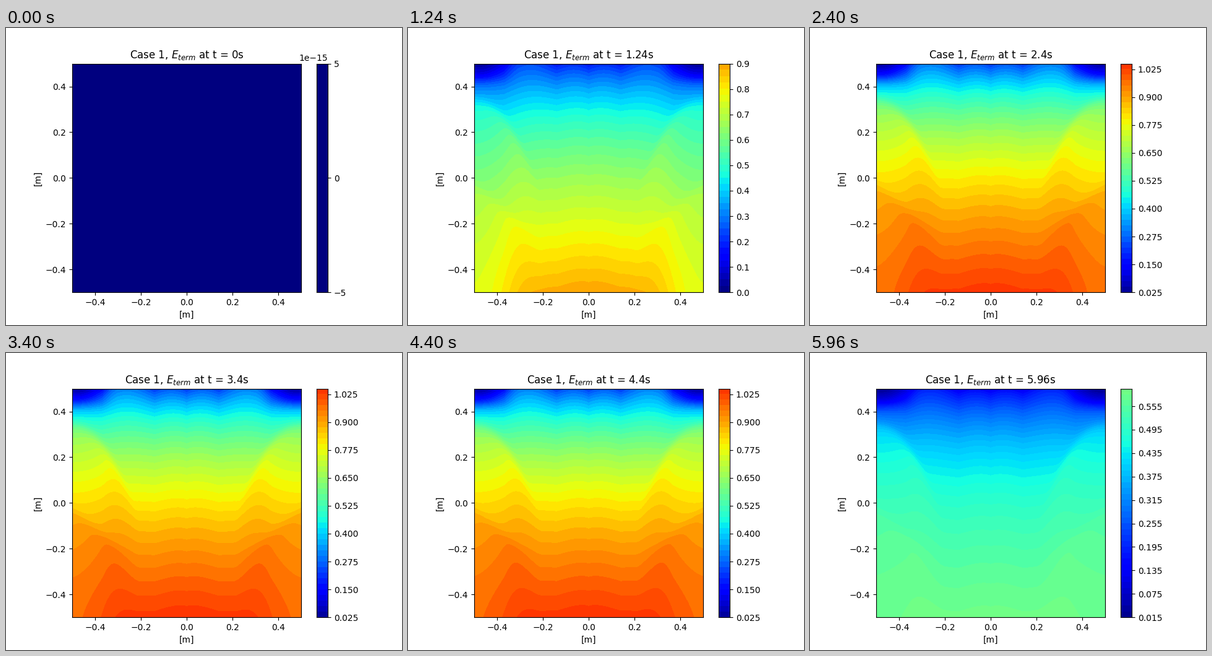
Animation of 640x480 px, one loop 6000 ms. Source, as a matplotlib script:

```python
import numpy as np
import matplotlib.pyplot as plt
from matplotlib.animation import FuncAnimation
from matplotlib.colorbar import make_axes
from matplotlib.ticker import FixedLocator, MaxNLocator

FRAMES, STEP = 150, 0.04
T_OFF = 4.5


def smooth(a, b, v):
    s = np.clip((v - a) / (b - a), 0, 1)
    return s * s * (3 - 2 * s)


def sigmoid(v):
    return 1 / (1 + np.exp(-v))


def front(depth, height, fade):
    """Sharp step at depth 0 that fades out further down."""
    return height * sigmoid(depth / .015) * np.exp(-np.maximum(depth, 0) / fade)


def steady_state(x, y):
    """Logarithmic fall towards the top, with ripples and side fronts."""
    d = .5 - y
    phase = np.minimum(np.pi * (x / .14) ** .713, 2 * np.pi)
    ripple = np.abs(np.sin(phase)) * (.01 + .12 * x * np.exp(-d / .12))
    depth = d * (1 - .15 * np.minimum(x, .22)) + ripple
    e = .21 + .4087 * np.log(1 + depth / .15)

    upper = .34 - 5 * (.5 - x) ** 2
    lower = -.03 - .85 * (.5 - x)
    e += smooth(.2, .36, x) * (front(upper - y, .11, .25) + front(lower - y, .05, .2))
    e -= .1837 * smooth(.3, .48, x) * sigmoid((y - .43) / .015)
    return e - .068 * smooth(.2, .5, x) * d ** 4


axis = np.linspace(-.5, .5, 370)
X, Y = np.meshgrid(np.abs(axis), axis)
steady = steady_state(X, Y)
side = smooth(.15, .5, X)

rise_rate = .68 + .052 * steady ** 8 - .07 * side
rest = .69 - .06 * side + .07 * np.sin(np.pi * steady)
fade_rate = .125 - .08 * side


def field(t):
    u = rise_rate * t
    e = steady * u / (1 + u ** 6) ** (1 / 6)
    d = t - T_OFF
    if d > 0:
        e = e * ((1 - rest) * np.exp(-d / .12) + rest * np.exp(-d * fade_rate))
    return e


def contour_levels(lo, hi):
    lev = MaxNLocator(41, min_n_ticks=1).tick_values(lo, hi)
    first = max(np.searchsorted(lev, lo) - 1, 0)
    return lev[first:np.searchsorted(lev, hi, side="right") + 1]


fig, ax = plt.subplots(figsize=(6.4, 4.8), dpi=100)
cax, _ = make_axes(ax)

style = dict(cmap="jet", vmin=0, vmax=1.22, origin="lower", interpolation="nearest")
image = ax.imshow(steady, extent=(-.5, .5, -.5, .5), **style)
ax.set(xlabel="[m]", ylabel="[m]")
for a in (ax.xaxis, ax.yaxis):
    a.set_major_locator(FixedLocator(np.arange(-2, 3) / 5))
title = ax.set_title("")

bar = cax.imshow([[0], [1]], extent=(0, 1, 0, 1), transform=cax.transAxes,
                 aspect="auto", **style)
cax.set_xticks([])
cax.yaxis.tick_right()
cax.yaxis.set_offset_position("right")


def update(i):
    t = i * STEP
    e = field(t)
    lev = contour_levels(e.min(), e.max())
    mid = (lev[:-1] + lev[1:]) / 2
    band = np.clip(np.searchsorted(lev, e, side="right") - 1, 0, len(mid) - 1)
    image.set_data(mid[band])
    bar.set_data(mid[:, None])
    cax.set_ylim(lev[0], lev[-1])
    cax.yaxis.set_major_locator(FixedLocator(lev, nbins=10))
    title.set_text(f"Case 1, $E_{{term}}$ at t = {t:.4g}s")
    return image, bar, title


anim = FuncAnimation(fig, update, frames=FRAMES, interval=40,
                     repeat=True, repeat_delay=0, blit=False)
plt.show()
```
